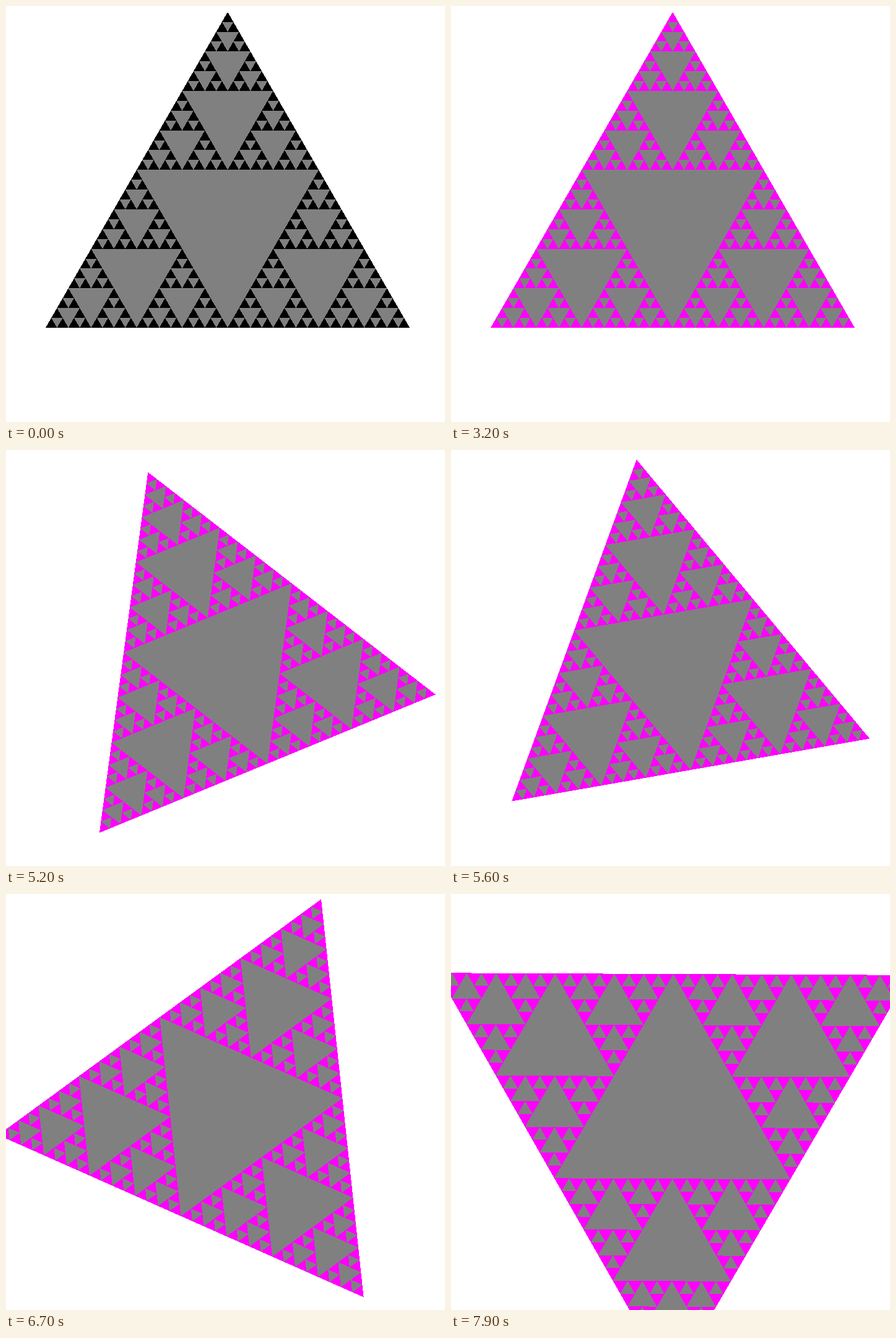
An HTML page that plays this animation: 709 px wide and 671 px high, repeating every 8 s.

```html
<!DOCTYPE html>
<html lang="en">
<head>
<meta charset="utf-8">
<title>Sierpinski triangle</title>
<style>
  html, body { margin: 0; width: 100%; height: 100%; overflow: hidden; background: #fff; }
  svg { display: block; }
</style>
</head>
<body>
<svg width="709" height="671" viewBox="0 0 709 671" shape-rendering="crispEdges">
  <g id="fractal">
    <path id="solid"/>
    <path id="holes" fill="#808080"/>
  </g>
</svg>
<script>
const LOOP = 8000, STEP = 100, DEPTH = 5, SPIN_START = 4600;
const CENTER = [358, 349.2], RADIUS = 339.5;

// [start time, value]
const COLORS = [[0, '#000'], [1100, '#f00'], [1900, '#0f0'], [2200, '#00f'], [3200, '#f0f']];
const ZOOMS = [[0, 1], [SPIN_START, 0.998], [6700, 1.098], [7000, 1.198], [7600, 1.297]];
const ANGLES = [[SPIN_START, -41], [5200, -22.33], [6100, 5.6], [6700, 23.9], [7400, 45.07], [7900, 60.27]];

const [fractal, solid, holes] = ['fractal', 'solid', 'holes'].map(id => document.getElementById(id));

const mid = (p, q) => [(p[0] + q[0]) / 2, (p[1] + q[1]) / 2];
const polygon = points => 'M' + points.map(p => p.map(v => v.toFixed(3))).join('L') + 'Z';

function cutHoles(a, b, c, depth) {
  if (!depth) return '';
  const ab = mid(a, b), bc = mid(b, c), ca = mid(c, a);
  return polygon([ab, bc, ca]) +
    cutHoles(a, ab, ca, depth - 1) +
    cutHoles(ab, b, bc, depth - 1) +
    cutHoles(ca, bc, c, depth - 1);
}

const corners = [-90, 30, 150].map(deg => {
  const a = deg * Math.PI / 180;
  return [RADIUS * Math.cos(a), RADIUS * Math.sin(a)];
});
solid.setAttribute('d', polygon(corners));
holes.setAttribute('d', cutHoles(...corners, DEPTH));

const held = (keys, t) => keys.filter(([start]) => start <= t).pop()[1];

function angleAt(t) {
  if (t < SPIN_START) return 0;
  const next = Math.max(1, ANGLES.findIndex(([time]) => time >= t));
  const [t0, a0] = ANGLES[next - 1], [t1, a1] = ANGLES[next];
  return a0 + (a1 - a0) * (t - t0) / (t1 - t0);
}

function draw(now) {
  const t = Math.floor(now % LOOP / STEP) * STEP;
  solid.setAttribute('fill', held(COLORS, t));
  fractal.setAttribute('transform',
    `translate(${CENTER}) rotate(${angleAt(t)}) scale(${held(ZOOMS, t)})`);
}

let origin;
function tick(now) {
  origin ??= now;
  draw(now - origin);
  requestAnimationFrame(tick);
}
draw(0);
requestAnimationFrame(tick);
</script>
</body>
</html>
```
